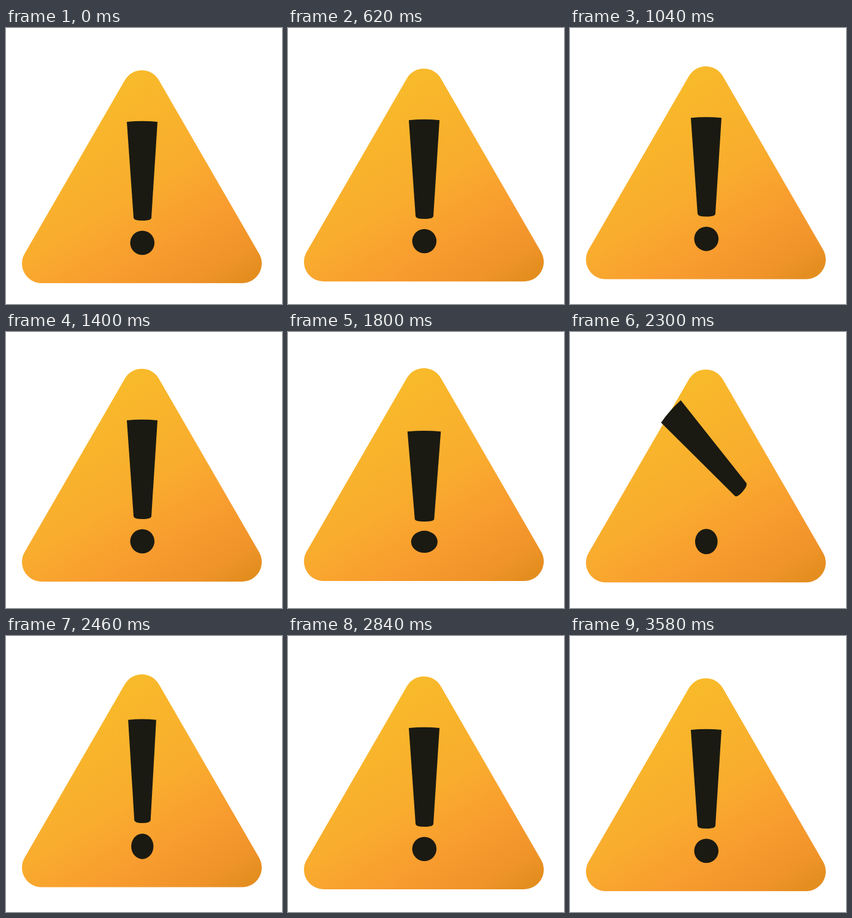
These frames come from a looping animation (450x450 px, 3600 ms). An HTML page:

```html
<!DOCTYPE html>
<html lang="en">
<head>
<meta charset="utf-8">
<title>Warning sign</title>
<style>
  html, body { margin: 0; width: 100%; height: 100%; overflow: hidden; background: #fff; }
  svg { display: block; width: 100%; height: 100%; }
</style>
</head>
<body>
<svg viewBox="0 0 450 450">
  <defs>
    <linearGradient id="amber" gradientUnits="userSpaceOnUse" x1="221" y1="69" x2="413" y2="392">
      <stop offset="0" stop-color="#f8ba2a"/>
      <stop offset=".45" stop-color="#f9ac2e"/>
      <stop offset=".7" stop-color="#f89c2f"/>
      <stop offset=".9" stop-color="#f0942a"/>
      <stop offset="1" stop-color="#e48e20"/>
    </linearGradient>
  </defs>
  <g id="sign">
    <path fill="url(#amber)" d="M193.8 85A32 32 0 0 1 249.2 85L412.7 368A32 32 0 0 1 385 416H58A32 32 0 0 1 30.3 368Z"/>
    <g id="mark" fill="#1a1a12">
      <path id="bar" d="M197 153Q222 150.500 247 153L237 309.500Q236.500 314 222.300 314Q208.500 314 208 309.500Z"/>
      <circle cx="222.3" cy="350.3" r="19.8"/>
    </g>
  </g>
</svg>
<script>
const LOOP = 3600, FLOAT = 3500, RISE = 10;
const SPIN_START = 1920, SPIN_END = 2415;
const LIFT = 35, STRETCH = 0.155;
const BASE = [222.2, 370], PIVOT = [222.2, 232.5];

// time, x scale, y scale of the whole mark
const SQUASH = [
  [0, 1, 1],
  [1700, 1, 1],
  [1810, 1.09, 0.91],
  [1900, 1.09, 0.91],
  [2100, 1.01, 1.02],
  [2400, 0.9, 1.055],
  [2460, 0.915, 1.045],
  [2640, 1, 1],
  [LOOP, 1, 1]
];

const [sign, mark, bar] = ["sign", "mark", "bar"].map(id => document.getElementById(id));
const ease = p => (1 - Math.cos(Math.PI * p)) / 2;
const clamp = p => Math.min(1, Math.max(0, p));
const move = (x, y) => `translate(${x} ${y})`;
const around = ([x, y], change) => move(x, y) + change + move(-x, -y);

function squashAt(t) {
  const i = SQUASH.findIndex(step => step[0] > t);
  const a = SQUASH[i - 1], b = SQUASH[i];
  const p = ease((t - a[0]) / (b[0] - a[0]));
  return [1, 2].map(k => a[k] + (b[k] - a[k]) * p);
}

function draw(t) {
  // one float up and down, then a short rest
  sign.setAttribute("transform", move(0, -RISE * ease(2 * clamp(t / FLOAT))));

  const [sx, sy] = squashAt(t);
  mark.setAttribute("transform", around(BASE, `scale(${sx} ${sy})`));

  const p = clamp((t - SPIN_START) / (SPIN_END - SPIN_START));
  const hop = Math.sin(Math.PI * p);
  const spin = `rotate(${360 * ease(p)}) scale(${1 - 0.03 * hop} ${1 + STRETCH * hop})`;
  bar.setAttribute("transform", move(0, -LIFT * hop) + around(PIVOT, spin));
}

const start = performance.now();
function tick(now) {
  draw(Math.max(0, now - start) % LOOP);
  requestAnimationFrame(tick);
}
draw(0);
requestAnimationFrame(tick);
</script>
</body>
</html>
```
